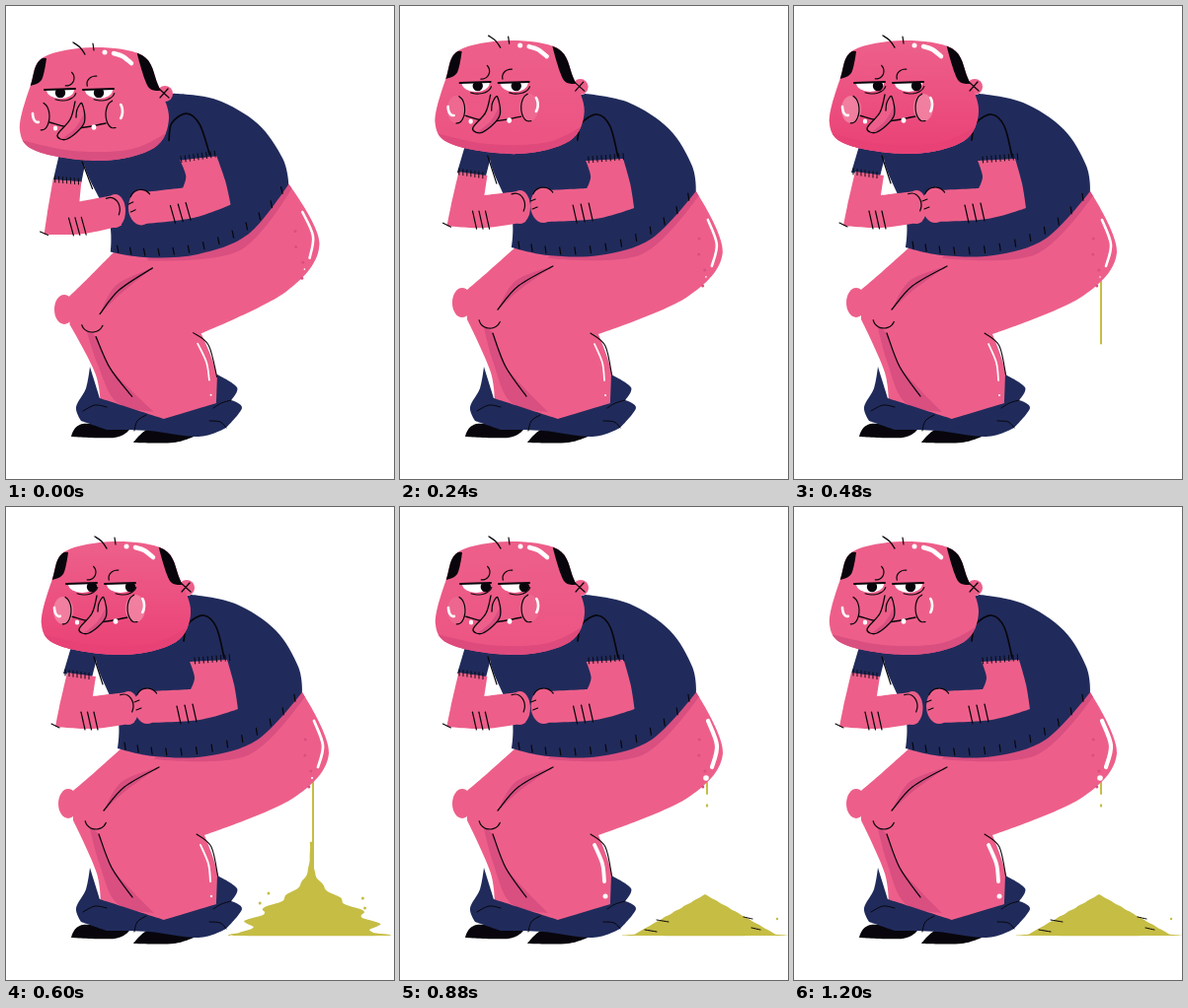
Write an HTML page with a canvas that moves like this. It is 393 by 480 pixels and loops after 1520 ms.

```html
<!DOCTYPE html>
<html lang="en">
<head>
<meta charset="utf-8">
<title>Squat</title>
<style>
html, body { margin: 0; width: 100%; height: 100%; overflow: hidden; background: #fff; }
canvas { display: block; width: 393px; height: 480px; }
</style>
</head>
<body>
<canvas id="stage" width="393" height="480"></canvas>
<script>
const ctx = document.getElementById('stage').getContext('2d');
const LOOP = 1520, STEP = 40, GROUND = 435;
const PINK = '#ed5f8a', SHADE = '#d94f80', NAVY = '#202b5b', INK = '#08060c';
const SLIME = '#c6bd45', WHITE = '#fff';

const clamp = v => Math.max(0, Math.min(1, v));
const ramp = (t, a, b) => clamp((t - a) / (b - a));
const smooth = (t, a, b) => { const k = ramp(t, a, b); return k * k * (3 - 2 * k); };
const mix = (a, b, k) => a + (b - a) * k;
const noise = n => { const v = Math.sin(n * 127.1) * 43758.5; return v - Math.floor(v); };

// "x,y" key points; a trailing ! makes a sharp corner
const parse = s => s.split(' ').map(p => {
  const [x, y] = p.replace('!', '').split(',').map(Number);
  return { x, y, hard: p.endsWith('!') };
});

const still = (x, y) => [x, y];
let warp = still;

function trace(shape, closed) {
  const pts = (typeof shape === 'string' ? parse(shape) : shape).map(p => {
    const [x, y] = warp(p.x, p.y);
    return { x, y, hard: p.hard };
  });
  const n = pts.length;
  const at = i => closed ? pts[(i + n) % n] : pts[Math.max(0, Math.min(n - 1, i))];
  ctx.beginPath();
  ctx.moveTo(pts[0].x, pts[0].y);
  for (let i = 0; i < (closed ? n : n - 1); i++) {
    const a = at(i - 1), b = at(i), c = at(i + 1), d = at(i + 2);
    const u = b.hard ? 0 : 1 / 6, v = c.hard ? 0 : 1 / 6;
    ctx.bezierCurveTo(b.x + (c.x - a.x) * u, b.y + (c.y - a.y) * u,
      c.x - (d.x - b.x) * v, c.y - (d.y - b.y) * v, c.x, c.y);
  }
  if (closed) ctx.closePath();
}

function fill(shape, color) {
  trace(shape, true);
  ctx.fillStyle = color;
  ctx.fill();
}

function line(shape, width = 1.3, color = INK) {
  trace(shape, false);
  ctx.strokeStyle = color;
  ctx.lineWidth = width;
  ctx.stroke();
}

function oval(x, y, rx, ry, color) {
  const [cx, cy] = warp(x, y);
  ctx.beginPath();
  ctx.ellipse(cx, cy, rx, ry, 0, 0, 7);
  ctx.fillStyle = color;
  ctx.fill();
}
const dot = (x, y, r, color) => oval(x, y, r, r, color);

// Angles in degrees, clockwise from the right
function arc(x, y, rx, ry, from, to, width, color) {
  line(Array.from({ length: 7 }, (_, i) => {
    const a = mix(from, to, i / 6) * Math.PI / 180;
    return { x: x + rx * Math.cos(a), y: y + ry * Math.sin(a) };
  }), width, color);
}

// A row of short parallel strokes
function strokes(count, x, y, stepX, stepY, dx, dy, width = 1.2) {
  for (let i = 0; i < count; i++) {
    const a = { x: x + i * stepX, y: y + i * stepY };
    line([a, { x: a.x + dx, y: a.y + dy }], width);
  }
}

function faded(alpha, paint) {
  ctx.globalAlpha = alpha;
  paint();
  ctx.globalAlpha = 1;
}

function clipped(shape, paint) {
  ctx.save();
  trace(shape, true);
  ctx.clip();
  paint();
  ctx.restore();
}

// Leaning pose: the further from the feet, the larger the shift
const lean = amount => (x, y) => {
  const h = Math.max(0, 405 - y);
  return [
    x - amount * (.05 * h + .00006 * h * h) * (.6 + .4 * x / 300),
    y - amount * (x - 185) * .063 * Math.min(1, h / 115)
  ];
};
const shift = (base, dx, dy) => (x, y) => {
  const [u, v] = base(x, y);
  return [u + dx, v + dy];
};

function drawLegs(wet) {
  fill('66,437! 78,424 125,430! 110,438', INK);
  fill('129,443! 150,427 192,436! 170,443', INK);

  const skin = '118,244! 90,269 68,288! 68,318! 92,372 96,410! 160,425! 212,414! 215,375 201,333! 290,296 327,250 300,188! 200,200!';
  fill(skin, PINK);
  oval(63, 301, 10, 15, PINK);
  clipped(skin, () => {
    fill('84,322! 94,332! 108,367 150,412! 112,402 94,360', SHADE);
    fill('150,256! 245,252 306,188! 280,190! 160,240!', SHADE);
    fill('99,309! 117,279 155,264! 120,289', SHADE);
  });
  line('94,332 107,366 128,396');
  line('99,308 120,284 155,264');
  dot(91, 317, 10, PINK);
  arc(91, 317, 11, 10, 170, 20, 1.2);
  line('193,332 208,345 215,377', 1.1);
  for (let i = 0; i < 4; i++) dot(mix(296, 310, noise(i + 3)), 284 - i * 16, 1.5, SHADE);

  line('312,217 321,242 316,264', mix(2.6, 4.2, wet), WHITE);
  line('197,343 205,362 207,380', mix(1.7, 3.8, wet), WHITE);
  dot(208, 395, mix(1, 2.5, wet), WHITE);
  dot(310, 275, mix(.8, 2.8, wet), WHITE);
}

function drawTrousers() {
  fill('85,366! 81,388 71,407 76,421! 102,430! 145,431 195,437 223,428! 239,408 228,400! 234,387 214,374! 213,403! 160,419! 95,398!', NAVY);
  line('78,411 90,405 102,407', 1);
  line('130,431 133,421 142,415', 1);
  line('228,400 218,403 210,408', 1);
  line('223,428 217,422 206,421', 1);
}

function drawShirt() {
  fill('66,142! 58,169! 87,173! 95,142!', NAVY);
  fill('90,135! 93,163 113,212 113,245! 150,253 202,253 255,236 300,188! 296,162 273,125 232,98 188,89! 150,100!', NAVY);
  const hem = (k, a, b, c, d) => mix(mix(mix(a, b, k), mix(b, c, k), k), mix(mix(b, c, k), mix(c, d, k), k), k);
  for (let k = .05; k < .95; k += .075) {
    strokes(1, hem(k, 113, 165, 255, 300), hem(k, 245, 260, 260, 188) - 1, 0, 0, -1, -7);
  }
  line('180,136 184,119 200,110 213,122 221,153', 1.7);
  line('89,152 98,180', 1.2);
}

function drawArms(base, squeeze) {
  warp = shift(base, 4 * squeeze, 0);
  fill('58,168! 87,172! 84,192! 118,188! 126,219! 85,225 46,223! 50,203', PINK);
  oval(120, 204, 10.5, 17, PINK);
  strokes(3, 72, 208, 6.5, 0, 4, 18);
  arc(115, 202, 10, 12, -110, 30, 1.2);
  line('42,220 50,224', 1.1);

  warp = shift(base, -4 * squeeze, 0);
  fill('190,157! 228,155! 235,180 239,205! 200,216 146,219! 150,187! 191,185! 195,173', PINK);
  oval(147, 202, 13, 18, PINK);
  strokes(3, 177, 202, 8, -1, 4, 18);
  arc(147, 194, 11, 10, -160, -30, 1.2);
  strokes(2, 134, 198, 2, 8, 5, -2, 1.1);

  warp = base;
  strokes(7, 60, 165, 4, .6, 0, 6, 1);
  strokes(9, 191, 153, 4.4, -.4, .5, 6, 1);
}

function drawEye(x, y, gaze) {
  clipped([[-17, 0], [17, -1], [17, 14], [-17, 14]].map(([dx, dy]) => ({ x: x + dx, y: y + dy, hard: true })), () => {
    oval(x, y, 14, 9, WHITE);
    dot(x + gaze, y + 3, 5.2, INK);
  });
  line([{ x: x - 16, y }, { x: x + 15, y: y - 1 }], 2);
  arc(x + 2, y + 2, 14, 9, 10, 120, 1.1);
}

function drawCheek(x, y, side, flush) {
  faded(flush * .8, () => oval(x, y, 10, 14, '#f28ba8'));
  arc(x, y, 8, 14, side < 0 ? -75 : 75, side < 0 ? 95 : 260, 1.2);
  arc(x + 4 * side, y - 3, 5, 9, side < 0 ? 180 : 50, side < 0 ? 80 : -50, 2.6, WHITE);
}

function drawHead(flush, gaze) {
  const skull = '36,119 47,73 60,45 110,35 160,43 176,73 187,107 172,137 120,150 55,141';
  dot(183, 82, 8, PINK);
  fill(skull, PINK);
  clipped(skull, () => {
    fill('34,128! 90,140 150,138 190,118! 190,155! 34,155!', SHADE);
    faded(flush * .85, () => {
      const [, top] = warp(0, 40), [, end] = warp(0, 140);
      const heat = ctx.createLinearGradient(0, top, 0, end);
      heat.addColorStop(0, 'rgba(234,63,116,0)');
      heat.addColorStop(1, '#ea3f74');
      fill('30,30! 195,30! 195,155! 30,155!', heat);
    });
    fill('46,74! 50,45! 63,46! 58,68', INK);
    fill('154,38! 178,38! 182,78! 166,75', INK);
  });

  strokes(1, 177, 77, 0, 0, 10, 9);
  strokes(1, 186, 77, 0, 0, -8, 9);
  line('90,30 97,35 102,42');
  strokes(1, 110, 31, 0, 0, 1, 7);
  line('131,41 140,44 149,51', 4.5, WHITE);
  dot(122, 40, 2.5, WHITE);

  arc(83, 66, 8, 8, -45, 95, 1.2);
  arc(113, 72, 9, 8, 165, 275, 1.2);
  drawEye(77, 78, gaze);
  drawEye(116, 78, gaze);

  line('66,111 92,117 123,112', 1.4);
  oval(72, 117, 2.2, 2.6, WHITE);
  oval(111, 116, 2.4, 2.8, WHITE);
  drawCheek(58, 105, -1, flush);
  drawCheek(131, 103, 1, flush);

  fill('94,96 88,108 74,124 84,128 101,111 100,92', PINK);
  fill('77,129! 92,117 101,102! 101,112 90,125', SHADE);
  line('92,90 87,108 74,124 84,128 101,112 99,92 94,98 93,106');
}

// Heap outline from a half-width rule over relative height
function heap(height, width) {
  const N = 32, side = (s, i) => {
    const h = i / N;
    return { x: 309 + s * width(h, s), y: GROUND - h * height };
  };
  const left = [], right = [];
  for (let i = 0; i <= N; i++) {
    left.push(side(-1, i));
    right.unshift(side(1, i));
  }
  return [...left, ...right];
}

function drawSlime(t) {
  if (t < 480) return;
  const settle = 1 - (1 - ramp(t, 600, 720)) ** 2;
  const end = t <= 600 ? mix(283, 432, ramp(t, 440, 540)) : mix(380, 291, ramp(t, 600, 680));
  line([{ x: 311, y: 279 }, { x: 311, y: end }], 2, SLIME);
  if (t >= 540) {
    const grow = ramp(t, 480, 600);
    fill(heap(mix(95 * grow, 42, settle), (h, s) => {
      const wave = Math.cos(h * 44 + s * .7);
      const splash = (66 * Math.exp(-((h / .42) ** 2.4)) + 1) * mix(.48, 1, grow) * (1 + .11 * wave);
      const pile = 74 * (1 - h) + 2 * wave * h * (1 - h);
      return mix(splash, pile, settle);
    }), SLIME);
  }
  if (t >= 600) {
    faded(1 - settle, () => {
      for (let i = 0; i < 4; i++) dot(309 + (i % 2 ? 1 : -1) * mix(38, 56, noise(i + 1)), 392 + i * 5, 1.5, SLIME);
    });
  }
  if (t >= 680) {
    oval(311, 303, 1.2, 1.8, SLIME);
    dot(382, 418, 1.2, SLIME);
    strokes(2, 260, 419, -12, 10, 12, 2, 1);
    strokes(2, 357, 418, 8, 11, -9, -2, 1);
  }
}

function gazeAt(t) {
  if (t >= 1160) return t < 1200 ? 6 : 2;
  return 6 * smooth(t, 160, 360) + 4 * smooth(t, 400, 560) - smooth(t, 840, 1000);
}

function draw(t) {
  const crouch = (1 - ramp(t, 0, 320)) ** 3;
  const strain = smooth(t, 160, 340) * (1 - smooth(t, 760, 960));
  const body = lean(crouch);
  ctx.clearRect(0, 0, 393, 480);
  ctx.lineCap = ctx.lineJoin = 'round';
  warp = still;
  drawSlime(t);
  warp = body;
  drawLegs(smooth(t, 560, 760));
  warp = still;
  drawTrousers();
  warp = body;
  drawShirt();
  drawArms(body, strain);
  warp = shift(still, -22 * crouch, 7 * crouch);
  drawHead(strain, gazeAt(t));
}

const start = performance.now();
function tick() {
  const t = (performance.now() - start) % LOOP;
  draw(Math.floor(t / STEP) * STEP);
  requestAnimationFrame(tick);
}
tick();
</script>
</body>
</html>
```
